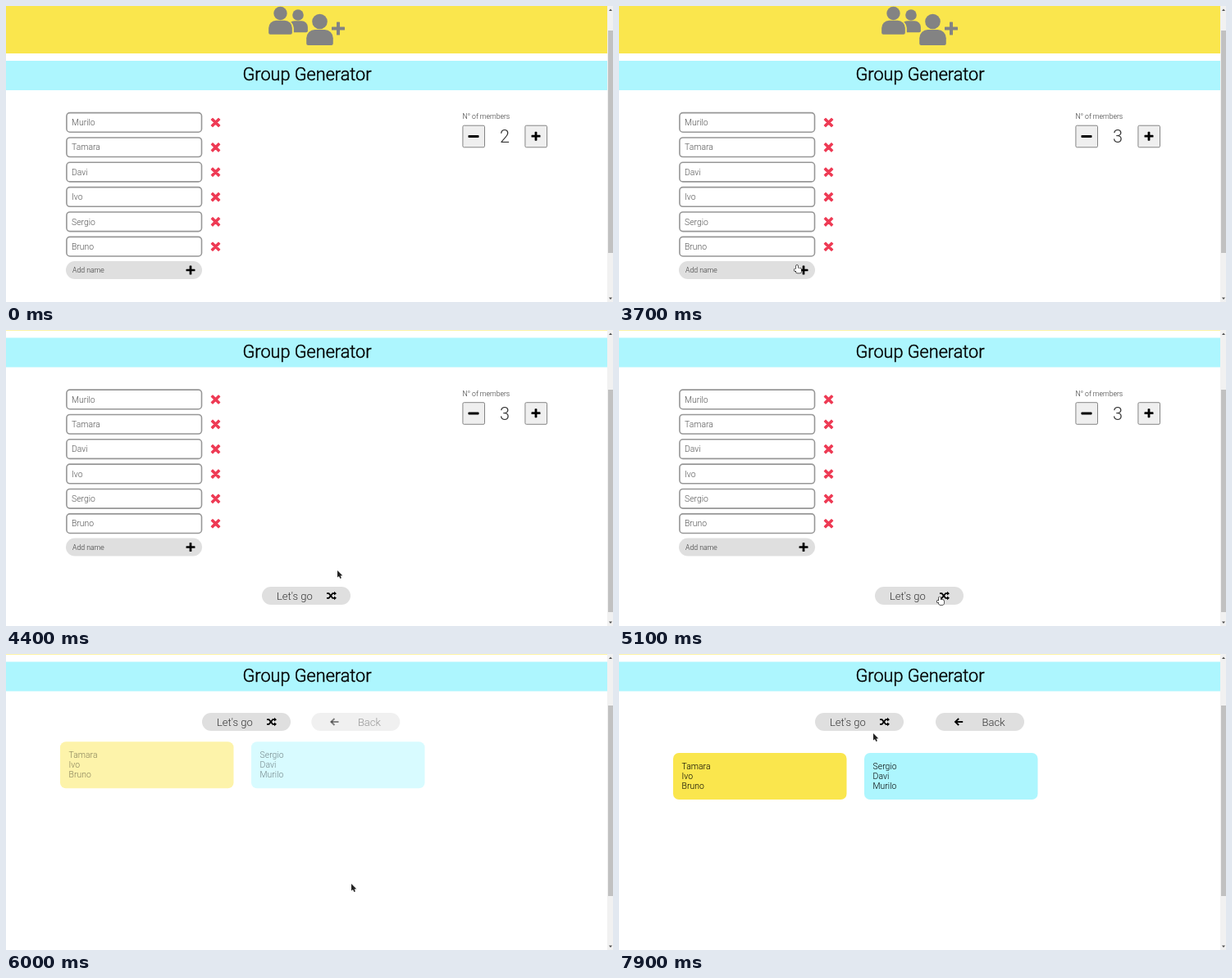
Recreate the animation shown at these times as an HTML page with a canvas. Size 740 by 362 pixels, loop 8 s.

```html
<!DOCTYPE html>
<html lang="en">
<head>
<meta charset="utf-8">
<title>Group Generator</title>
<style>
html, body { margin: 0; width: 740px; height: 362px; overflow: hidden; background: #fff; }
canvas { display: block; }
</style>
</head>
<body>
<canvas id="stage" width="740" height="362"></canvas>
<script>
const ctx = document.getElementById('stage').getContext('2d');
const LOOP = 8000, STEP = 100;
const YELLOW = '#fae64d', CYAN = '#adf6fe', PILL = '#dfdfdf', RED = '#ee3a54', GREY = '#838383';
const INK = '#333';
const NAMES = ['Murilo', 'Tamara', 'Davi', 'Ivo', 'Sergio', 'Bruno'];
const GROUPS = [[1, 3, 5], [4, 2, 0]];
const SCROLL = 57.5;
const EXIT = 5225, ENTER = 5720;

// Pointer stops: arrival time, x, y
const PATH = [
  [700, 729, 262], [1600, 625, 154], [2200, 640, 160], [2800, 640, 160], [3700, 217, 317],
  [4400, 404, 294], [4900, 391, 326], [5400, 391, 327], [6000, 421, 281], [7300, 390, 209], [7900, 310, 97]
];

const span = (t, a, b) => Math.max(0, Math.min(1, (t - a) / (b - a)));
const smooth = u => u * u * (3 - 2 * u);
const mix = (a, b, u) => a + (b - a) * u;

// CSS "ease" curve
function ease(x) {
  const bez = (s, p, q) => 3 * (1 - s) * (1 - s) * s * p + 3 * (1 - s) * s * s * q + s * s * s;
  let lo = 0, hi = 1;
  for (let i = 0; i < 24; i++) {
    const m = (lo + hi) / 2;
    if (bez(m, .25, .25) < x) lo = m; else hi = m;
  }
  return bez(lo, .1, 1);
}

function rect(x, y, w, h, color) {
  ctx.fillStyle = color;
  ctx.fillRect(x, y, w, h);
}

function round(x, y, w, h, r, fill, stroke, line) {
  ctx.beginPath();
  ctx.roundRect(x, y, w, h, r);
  ctx.fillStyle = fill;
  ctx.fill();
  if (stroke) { ctx.strokeStyle = stroke; ctx.lineWidth = line; ctx.stroke(); }
}

function text(str, x, y, size, color = INK, align = 'left') {
  ctx.font = `300 ${size}px Roboto, sans-serif`;
  ctx.fillStyle = color;
  ctx.textAlign = align;
  ctx.fillText(str, x, y);
}

function at(x, y, alpha, draw) {
  ctx.save();
  ctx.globalAlpha = alpha;
  ctx.translate(x, y);
  draw();
  ctx.restore();
}

// One path, so that it also fades evenly
function plus(x, y, size, thick, color = '#000', turn = 0) {
  at(x, y, ctx.globalAlpha, () => {
    ctx.rotate(turn);
    ctx.beginPath();
    ctx.roundRect(-size / 2, -thick / 2, size, thick, .6);
    ctx.roundRect(-thick / 2, -size / 2, thick, size, .6);
    ctx.fillStyle = color;
    ctx.fill();
  });
}

function trace(points) {
  ctx.beginPath();
  points.forEach(([x, y]) => ctx.lineTo(x, y));
}

function poly(points, color) {
  trace(points);
  ctx.closePath();
  ctx.fillStyle = color;
  ctx.fill();
}

function line(points, width) {
  trace(points);
  ctx.strokeStyle = '#000';
  ctx.lineWidth = width;
  ctx.stroke();
}

// All parts follow from the head radius
function person(x, y, r, color = GREY) {
  ctx.beginPath();
  ctx.arc(x, y, r, 0, 7);
  ctx.fillStyle = color;
  ctx.fill();
  round(x - 1.75 * r, y + 1.08 * r, 3.5 * r, 2.05 * r, [1.1 * r, 1.1 * r, 2, 2], color);
}

function header() {
  rect(0, 0, 733, 58, YELLOW);
  person(356, 11, 6.8);
  person(336.5, 9, 8.2, YELLOW);
  person(334.5, 9, 8.2);
  person(382.5, 19, 9.3);
  plus(405, 27.5, 16, 4, GREY);

  rect(0, 67, 733, 36, CYAN);
  text('Group Generator', 367, 91.3, 21.67, '#000', 'center');
  ctx.strokeStyle = '#000';
  ctx.lineWidth = .45;
  ctx.strokeText('Group Generator', 367, 91.3);
}

function stepButton(x, fill) {
  round(x - 13.3, 146.2, 26.6, 26.6, 1.5, fill, '#858585', 1);
}

function form(count, hover, press) {
  NAMES.forEach((name, i) => {
    const y = 142.3 + i * 30.35;
    round(73.9, y - 11.7, 164.6, 23.6, 4, '#fff', '#979797', 1.6);
    text(name, 80, y + 3.8, 10.4, '#555');
    plus(255.5, y + .2, 13.4, 3.6, RED, Math.PI / 4);
  });
  round(73, 312, 166, 22, 11, PILL);
  text('Add name', 81, 326, 8.67);
  plus(225, 323, 11, 2.7);

  text('N° of members', 556.5, 138, 8.67);
  stepButton(570.2, '#efefef');
  stepButton(646.2, press ? '#f5f5f5' : hover ? '#e3e3e3' : '#efefef');
  round(563.5, 158, 13, 3, .8, '#000');
  plus(646, 159.2, 11, 2.8);
  rect(586, 147, 44, 24, '#fff');
  text(count, 608, 167.3, 21.67, INK, 'center');
}

// Buttons are drawn around their own centre
function pill(label, x) {
  round(-54, -11, 108, 22, 11, PILL);
  text(label, x, 4.6, 13);
}

function goButton() {
  pill("Let's go", -36);
  for (const s of [-2.8, 2.8]) {
    line([[25, s], [27.6, s], [32.2, -s], [35, -s]], 1.7);
    poly([[34, s - 2.4], [37, s], [34, s + 2.4]], '#000');
  }
}

function backButton() {
  pill('Back', 2.6);
  line([[-29.8, 0], [-20.8, 0]], 1.9);
  line([[-25.8, -4], [-30, 0], [-25.8, 4]], 1.9);
}

function cards() {
  GROUPS.forEach((group, i) => {
    const x = 66 + i * 233;
    round(x, 0, 211.5, 57, 7, i ? CYAN : YELLOW);
    group.forEach((n, k) => text(NAMES[n], x + 10.6, 20 + k * 12.1, 10.4, '#000'));
  });
}

function scrollbar(top, height) {
  rect(733, 0, 7, 362, '#f1f1f1');
  rect(734, top, 6, height, '#c1c1c1');
  for (const [y, d] of [[6, -2.6], [356.5, 2.6]]) poly([[735, y], [737, y + d], [739, y]], '#505050');
}

function arrow() {
  const shape = [[0, 0], [0, 8.6], [2, 7], [3.4, 10], [4.9, 9.3], [3.6, 6.4], [6.2, 6.2]];
  ctx.strokeStyle = '#fff';
  ctx.lineWidth = 1;
  poly(shape, '#222');
  ctx.stroke();
  poly(shape, '#222');
}

function hand() {
  const parts = [[-1, 0, 2, 8, 1], [-3.4, 4.6, 6, 2.4, 1], [-1, 3.6, 6, 6, 1.6]];
  for (const [x, y, w, h, r] of parts) round(x, y, w, h, r, '#fff', '#222', 1.4);
  for (const [x, y, w, h, r] of parts) round(x, y, w, h, r, '#fff');
}

function pointer(t) {
  if (t < 500) return null;
  let i = 0;
  while (i < PATH.length - 2 && t >= PATH[i + 1][0]) i++;
  const [a, x0, y0] = PATH[i], [b, x1, y1] = PATH[i + 1];
  const u = smooth(span(t, a, b));
  return { x: mix(x0, x1, u), y: mix(y0, y1, u) };
}

function draw(t) {
  const results = t >= ENTER;
  const scroll = SCROLL * smooth(span(t, 3800, 4300));
  const out = ease(span(t, EXIT, EXIT + 500));
  const show = ease(span(t, ENTER, ENTER + 1000));
  const tip = pointer(t);
  const over = (x, y, w, h) => tip && Math.abs(tip.x - x) < w / 2 && Math.abs(tip.y - y) < h / 2;
  const goX = results ? 293 : 366;
  const goY = results ? 83 : 382.5 - scroll - 242 * out;

  rect(0, 0, 740, 362, '#fff');
  at(0, -scroll, 1, header);
  if (results) {
    const shift = 26 * (1 - show);
    at(440 - shift, 83, show, backButton);
    at(0, 121 - shift, show, cards);
  } else {
    const hover = over(646, 159.5 - scroll, 27, 27);
    at(0, -scroll - 166 * out, 1 - out, () => form(t < 2500 ? '2' : '3', hover, t === 2500));
  }
  at(goX, goY, 1, goButton);

  if (results) scrollbar(63, 233);
  else scrollbar(30 + 43 * scroll / SCROLL, 272);

  if (tip) {
    const link = over(goX, goY, 108, 22) || (!results && !out && over(156, 323 - scroll, 166, 22));
    at(tip.x, tip.y, 1, link ? hand : arrow);
  }
}

const start = performance.now();
function tick() {
  const t = (performance.now() - start) % LOOP;
  draw(Math.floor(t / STEP) * STEP);
  requestAnimationFrame(tick);
}
tick();
</script>
</body>
</html>
```
